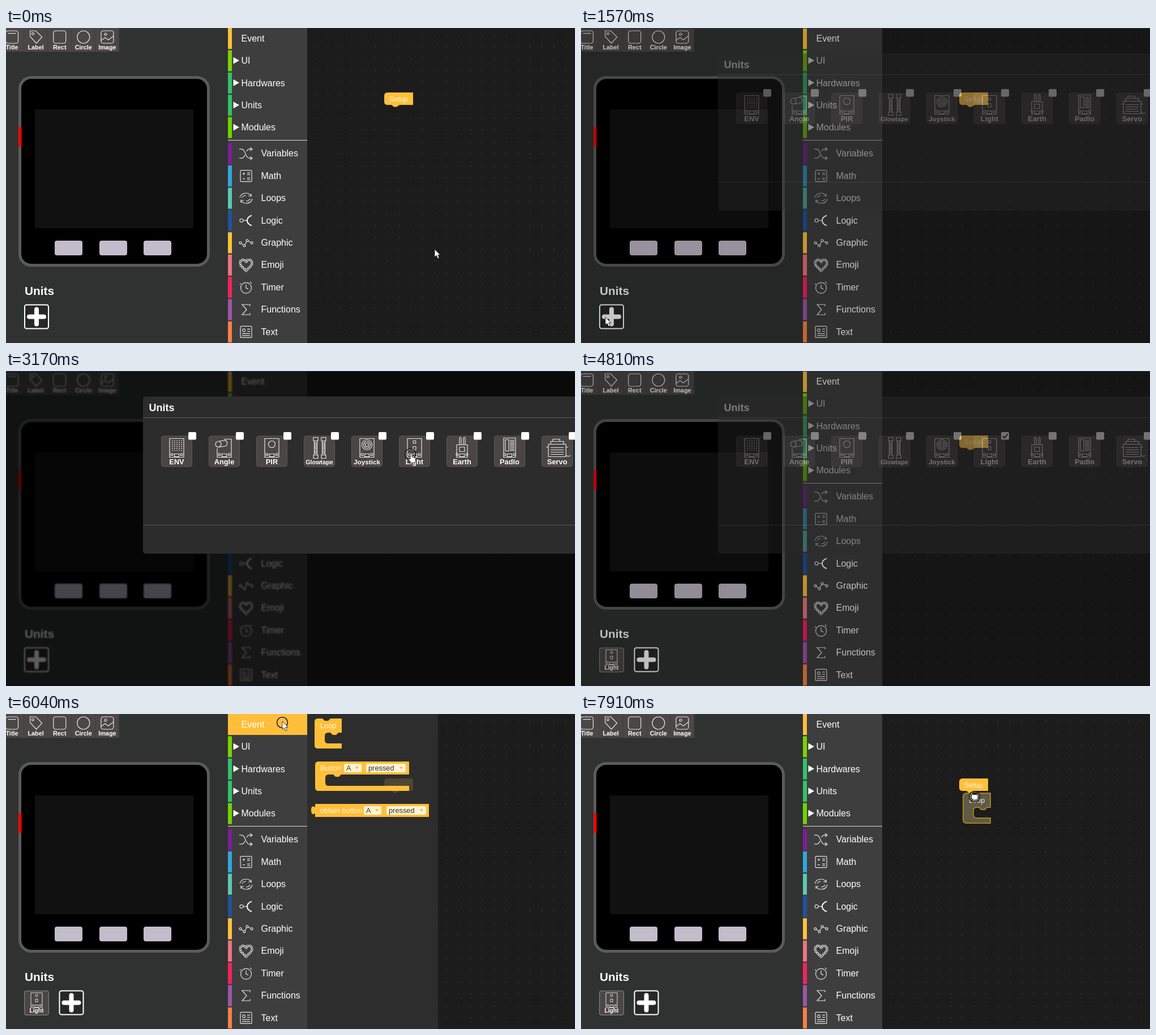
An HTML page for the animation above (8 s loop, 1005 by 557 pixels).

```html
<!DOCTYPE html>
<html lang="en">
<head>
<meta charset="utf-8">
<title>Block editor</title>
<style>
  html, body { margin: 0; width: 100%; height: 100%; overflow: hidden; background: #1c1c1c; }
  svg { display: block; width: 1005px; height: 557px; font-family: "Liberation Sans", Arial, sans-serif; }
  .line { fill: none; stroke: #e4e4e4; stroke-width: 1.2; }
  .bold { font-weight: bold; fill: #fff; }
  .mid { text-anchor: middle; }
  .block { fill: #ffbf38; }
  .word { fill: #fff; fill-opacity: .85; font-size: 12.8px; }
</style>
</head>
<body>
<svg viewBox="0 0 1005 557" xmlns="http://www.w3.org/2000/svg">
  <defs>
    <pattern id="dots" width="21" height="21" x="537" y="2" patternUnits="userSpaceOnUse">
      <rect x="10" y="10" width="1.2" height="1.2" fill="#4a4a4a"/>
    </pattern>
    <path id="loopShape" d="M6 0H14l4 4h6l4-4H48V25H42l-4 4h-6l-4-4H24Q18 25 18 31V38Q18 44 24 44H48V53H6Q0 53 0 47V6Q0 0 6 0Z"/>
  </defs>

  <g id="base">
    <rect width="1005" height="557" fill="#1c1c1c"/>
    <rect x="532" width="473" height="557" fill="url(#dots)"/>
    <g id="setup">
      <path class="block" d="M674 114H719V136H695l-5 3.500h-5l-4-3.500H674Q668 136 668 130V120Q668 114 674 114Z"/>
      <text class="word" x="676.500" y="129.500">Setup</text>
    </g>

    <rect width="392" height="557" fill="#303231"/>
    <g id="tools"></g>
    <rect x="24.500" y="87.500" width="333" height="332" rx="20" fill="#000" stroke="#5b5b5b" stroke-width="5"/>
    <rect x="22.500" y="175" width="5" height="35" fill="#f00"/>
    <rect id="screen" x="51" y="144" width="280" height="210" fill="#111"/>
    <g fill="#c1bdcb">
      <rect x="86" y="376" width="49" height="26" rx="4"/>
      <rect x="165" y="376" width="49" height="26" rx="4"/>
      <rect x="243" y="376" width="49" height="26" rx="4"/>
    </g>
    <text class="bold" x="33" y="472" font-size="20.800">Units</text>
    <g id="added" transform="translate(32 489) scale(.8)"></g>
    <g id="plus">
      <rect id="plusBox" x="1" y="1" width="42" height="42" rx="3.500" stroke="#fff" stroke-width="2"/>
      <path d="M22 9V35M9 22H35" stroke="#fff" stroke-width="8" stroke-linecap="round"/>
    </g>

    <g id="flyout">
      <rect x="532" width="231" height="557" fill="rgba(49,49,49,.85)"/>
      <g transform="translate(545 8)">
        <use id="loopItem" class="block" href="#loopShape" stroke-width="2"/>
        <text class="word" x="10" y="16.500">Loop</text>
      </g>
      <path class="block" d="M552 84H712V107H592l-4 4h-6l-4-4H570Q564 107 564 113V121Q564 127 570 127H712V136H552Q546 136 546 130V90Q546 84 552 84Z"/>
      <path class="block" d="M546 159H747V182H546V176q-7 4-7-6t7-5Z"/>
      <text class="word" x="555" y="100">Button</text>
      <text class="word" x="555" y="175">obtain button</text>
      <g id="fields"></g>
    </g>

    <rect x="392" width="140" height="557" fill="#3e3e3e"/>
    <g id="menu"></g>
    <path d="M392 198.500H532" stroke="#ddd"/>
  </g>

  <g id="drag">
    <use href="#loopShape" fill="#8a8060" fill-opacity=".62" stroke="#a4821f" stroke-width="2"/>
    <text class="word" x="10" y="16.500">Loop</text>
  </g>

  <rect id="shade" width="1005" height="557" fill="#000"/>
  <rect id="topLine" width="1005" height="1" fill="#12385c"/>

  <g id="dialog">
    <rect x="242" y="45" width="780" height="278" rx="5" fill="#2c2c2c"/>
    <path d="M242 82.500H1005M242 272.500H1005" stroke="#5a5a5a"/>
    <text class="bold" x="252.500" y="70.500" font-size="18">Units</text>
    <g id="cards"></g>
    <path id="tick" d="M745 115l3 3.500l5.500-7" fill="none" stroke="#222" stroke-width="2"/>
  </g>

  <g id="pointer">
    <g id="ring" fill="none">
      <circle r="9.300" stroke="#111" stroke-width="1.600"/>
      <circle r="8" stroke="#fff" stroke-opacity=".4"/>
    </g>
    <path id="arrow" d="M0 0V14L3.200 11.300L5.700 16.800L8.200 15.600L5.800 10.400H10Z" fill="#fff" stroke="#111" stroke-width=".8"/>
    <path id="hand" d="M0 1Q1.500-1 3 1V7l5.500 1.500Q10 9 9.600 11L8.500 17.500H1.500L-3 11.500Q-3.500 9.500-1.500 10L0 11Z" fill="#fff" stroke="#111" stroke-width=".9"/>
    <path id="fist" d="M-5-3q1.500-2 3 0q1.500-2 3 0q1.500-2 3 0q2-1 2 1V2L4 6H-3L-6 1Z" fill="#fff" stroke="#111" stroke-width=".9"/>
  </g>
</svg>
<script>
const $ = id => document.getElementById(id);
const put = (id, html) => { $(id).innerHTML = html; };
const line = d => `<path class="line" d="${d}"/>`;
const ring = (x, y, r) => `M${x - r} ${y}a${r} ${r} 0 1 0 ${2 * r} 0a${r} ${r} 0 1 0 ${-2 * r} 0`;
const box = (x, y, w, h) => `M${x} ${y}h${w}v${h}h${-w}z`;

// Top toolbar
const round = `<rect class="line" x="-11" y="5" width="22" height="22" rx="4"/>`;
const tools = [
  ["Title", round + line("M-7 9.500H7")],
  ["Label", line("M-10 5H0L11 16L1 27L-10 15Z" + ring(-5, 10, 2))],
  ["Rect", round],
  ["Circle", line(ring(0, 16, 11))],
  ["Image", round + line("M-11 22L-4 17L2 21L11 14" + ring(-3, 11, 2))]
];
put("tools", `<rect width="199.500" height="42" fill="#4b4747"/>` + tools.map(([name, icon], i) =>
  `<g transform="translate(${10.5 + 42.1 * i} 0)">${icon}
   <path d="M21 0V42" stroke="#423f3f"/>
   <text class="bold mid" y="38" font-size="10.900">${name}</text></g>`).join(""));

// Category menu
const heart = "M0 10L-10 0Q-12-8-6-9.500Q-2-10 0-5Q2-10 6-9.500Q12-8 10 0Z";
const top5 = [["Event", "#ffbf3b"], ["UI", "#7ad400"], ["Hardwares", "#33c269"], ["Units", "#33c269"], ["Modules", "#70d400"]];
const rest = [
  ["Variables", "#7f1d97", line("M-12-8h4q4 0 7 8t7 8h4M-12 8h4q4 0 6-6M1-4q2-4 5-4h4M7-11l4 3l-4 3M7 5l4 3l-4 3")],
  ["Math", "#2fa8dd", `<rect class="line" x="-10" y="-10" width="20" height="20" rx="2"/>` +
    line("M-6-4h4M-4-6v4M2-5.500h5M2-2.500h5M-6 5h4M2 3.500h5M2 6.500h5")],
  ["Loops", "#5cc8b4", line("M-11-1Q-9-9 0-9Q6-9 9-4V-8M9-4H4M11 1Q9 9 0 9Q-6 9-9 4V8M-9 4H-4M-7-1Q-5-5 0-5M7 1Q5 5 0 5")],
  ["Logic", "#20529d", line(ring(-8, 0, 3) + "M-5 0H2") + `<path d="M10-9Q2-6 2 0T10 9" fill="none" stroke="#fff" stroke-width="2"/>`],
  ["Graphic", "#ffc13b", line(ring(-10, 0, 2) + ring(-3, 5, 2) + ring(2, -4, 2) + ring(10, 0, 2) + "M-8 1L-5 4M-2 3L1-2M4-3L8-1")],
  ["Emoji", "#ee7480", [["#e4e4e4", 4.6], ["#3e3e3e", 2.4]].map(([c, w]) =>
    `<path d="${heart}" fill="none" stroke="${c}" stroke-width="${w}" stroke-linecap="round" stroke-dasharray="0 4.300"/>`).join("")],
  ["Timer", "#f5225f", line(ring(0, 1, 9.5) + "M0-5V1L4 3M-9-7l-2 2M7-10l3 3")],
  ["Functions", "#9c56a8", line("M7-6V-9H-7L1 0L-7 9H7V6")],
  ["Text", "#f98045", `<rect class="line" x="-10" y="-10" width="20" height="20" rx="2"/>` +
    line(ring(-4, -3, 2.5) + "M2-5H7M2-1H7M-7 3H7M-7 6.500H7")]
];
const row = 39.4;
put("menu", top5.map(([name, c], i) =>
  `<g transform="translate(392 ${row * i})"><rect ${i ? "" : 'id="eventBar"'} width="7" height="37" fill="${c}"/>
   ${i ? '<path d="M9.500 12V24L20 18Z" fill="#fff"/>' : ""}
   <text x="23.500" y="23.800" font-size="16" fill="#fff">${name}</text></g>`).join("") +
  rest.map(([name, c, icon], i) =>
  `<g transform="translate(392 ${203.7 + row * i})"><rect width="7" height="37" fill="${c}"/>
   <g transform="translate(32 18.500)">${icon}</g>
   <text x="58.500" y="23.800" font-size="16" fill="#fff">${name}</text></g>`).join(""));

// Dropdown fields on the flyout blocks
const field = (x, y, w, text) =>
  `<rect x="${x}" y="${y}" width="${w}" height="15" rx="3" fill="#fff3d4"/>
   <text x="${x + 4}" y="${y + 12}" font-size="12.800" fill="#333">${text}</text>
   <path d="M${x + w - 11} ${y + 5.5}h6l-3 4z" fill="#e9b34a"/>`;
put("fields", field(597, 88, 31, "A") + field(636, 88, 70, "pressed") + field(632, 163, 31, "A") + field(672, 163, 70, "pressed"));

// Unit cards
const feet = ring(19, 33, 2) + ring(36, 33, 2) + box(23.5, 32, 8, 5);
const board = box(15, 5, 25, 33) + feet;
const bars = (x, y, w, n, gap) => Array.from({ length: n }, (_, i) => `M${x} ${y + gap * i}h${w}`).join("");
const strip = x => box(x - 4, 3, 8, 6) + box(x - 2.5, 9, 5, 25) + box(x - 4, 34, 8, 6) + bars(x - 2.5, 12, 5, 8, 2.7);
const units = [
  ["ENV", line(board) + `<path class="line" stroke-dasharray="2 2" stroke-width="2" d="${bars(19, 9, 18, 6, 3.4)}"/>`],
  ["Angle", line("M27 6H40V38H15V22" + feet + ring(17, 15, 5) + "M16 10L30 8Q35 13 31 18L19 20")],
  ["PIR", line(board + ring(27.5, 15, 6))],
  ["Glowtape", line(strip(21) + strip(35)), 10.8],
  ["Joystick", line(board + ring(27.5, 16, 9) + ring(27.5, 16, 6) + ring(27.5, 16, 3)), 11.7],
  ["Light", line(board + ring(27.5, 11, 2.5) + box(25, 19, 5, 6))],
  ["Earth", line("M18 16H37V38H18Z" + feet + box(23, 20, 9, 8) + "M23 16V4q1.500-3 3 0V16M30 16V4q1.500-3 3 0V16")],
  ["Padlo", line(box(17, 4, 21, 34) + feet + box(20, 7, 6, 20) + bars(28, 8, 8, 8, 2.6))],
  ["Servo", line(box(12, 15, 31, 22) + box(16, 10, 23, 5) + "M8 20H12M43 20H47M20 10V6H32V10" + bars(16, 21, 23, 4, 4) + "M43 34q3 4 8 1")]
];
const card = ([name, icon, size = 12.8], textY) =>
  `<rect x=".5" y=".5" width="54" height="54" rx="4" fill="#4a4646" stroke="#5c5858"/>${icon}
   <text class="bold mid" x="27.500" y="${textY}" font-size="${size}">${name}</text>`;
put("cards", units.map((u, i) =>
  `<g transform="translate(${274 + 84 * i} 114.500)">${card(u, 50.5)}
   <rect x="48" y="-6.500" width="14" height="13.500" rx="2" fill="#fff"/></g>`).join(""));
put("added", card(units[5], 48.5) + `<rect x="1" y="1" width="53" height="53" rx="4" fill="none" stroke="#999"/>`);

// Pointer trips: start, steps, from, to
const STEP = 120, LOOP = 8000;
const trips = [
  [370, 7, 757, 391, 43, 511],
  [2060, 7, 43, 511, 688, 209],
  [2900, 1, 688, 209, 702, 176],
  [3050, 1, 702, 176, 714, 145],
  [3670, 3, 714, 145, 989, 469],
  [5200, 7, 909, 258, 488, 13],
  [6310, 4, 488, 13, 567, 18],
  [7190, 7, 567, 18, 695, 146]
];
function pointerAt(t) {
  let at = [757, 391];
  for (const [start, n, x0, y0, x1, y1] of trips) {
    if (t < start) break;
    const p = Math.min(n, Math.floor((t - start) / STEP) + 1) / n;
    const e = p * p * (3 - 2 * p);
    at = [x0 + (x1 - x0) * e, y0 + (y1 - y0) * e];
  }
  return at;
}

// Value of the last key that has passed
const held = (t, keys) => keys.reduce((v, [at, next]) => t >= at ? next : v, 0);
const show = (id, on) => { $(id).style.display = on ? "" : "none"; };
const move = (id, x, y) => $(id).setAttribute("transform", `translate(${x} ${y})`);
const set = (id, attrs) => { for (const k in attrs) $(id).setAttribute(k, attrs[k]); };

function draw(t) {
  const within = (a, b) => t >= a && t < b;
  const [x, y] = pointerAt(t);
  const dragging = t >= 7190, hand = within(3050, 3670);
  const added = t >= 4810, closing = within(4930, 5050);

  move("pointer", x, y);
  show("pointer", !within(4060, 5200));
  show("arrow", !hand && !dragging);
  show("hand", hand);
  show("fist", dragging);
  show("ring", within(1210, 1450) || within(3170, 3420) || within(6040, 6160) || t >= 7040);
  move("ring", 0, dragging ? 0 : 2);

  const fade = held(t, [[1570, .35], [1690, .75], [1810, 1], [4810, .4], [4930, .03], [5050, 0]]);
  set("shade", { opacity: fade * .64 });
  set("dialog", { opacity: closing ? 0 : fade });
  show("dialog", fade > 0);
  show("topLine", fade > 0);
  $("base").style.filter = fade ? `blur(${closing ? .35 : 1.3 * fade}px)` : "none";
  show("tick", t >= 3420);
  set("screen", closing ? { x: 52, y: 145, width: 278, height: 208, fill: "#1c1c1c" }
                        : { x: 51, y: 144, width: 280, height: 210, fill: "#111" });

  show("added", added);
  move("plus", added ? 93.5 : 32, 488.5);
  set("plusBox", { fill: within(1090, 1570) ? "#0a62a5" : "#262726" });

  set("eventBar", { width: within(5920, 7190) ? 140 : 7 });
  show("flyout", within(6040, 7190));
  set("loopItem", { stroke: t >= 6670 ? "#dca02a" : "none" });
  show("drag", dragging);
  move("drag", x - 20, y - 6);
}

function tick(now) {
  draw(now % LOOP);
  requestAnimationFrame(tick);
}
draw(0);
requestAnimationFrame(tick);
</script>
</body>
</html>
```
